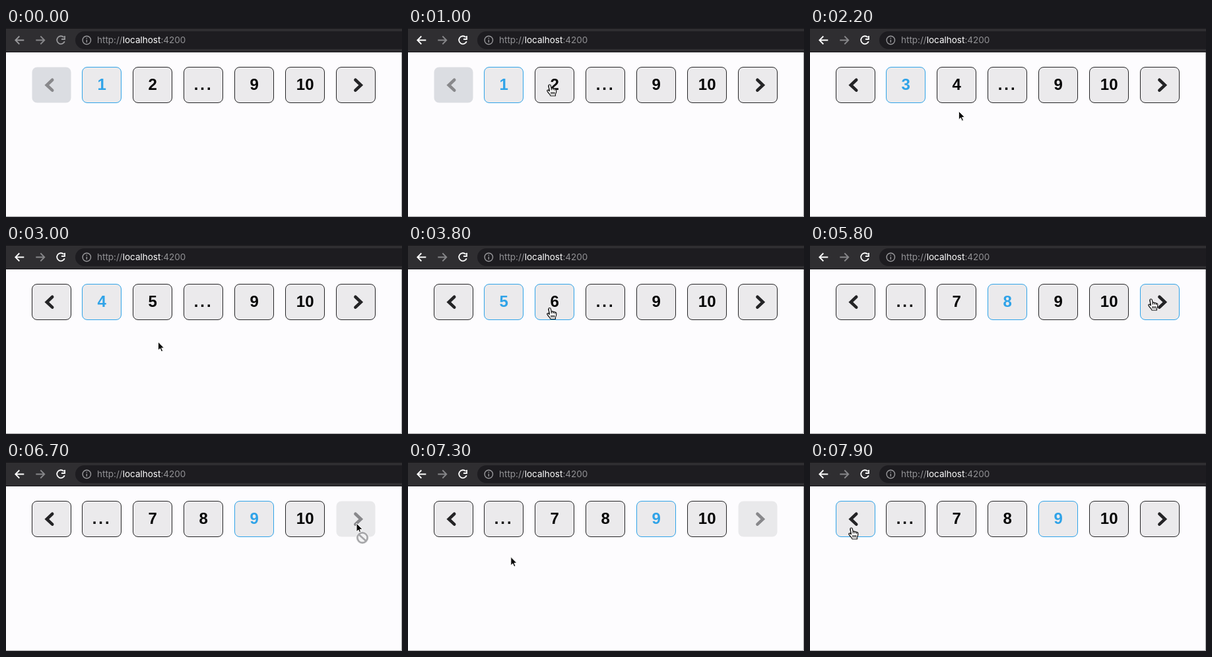
Animation, 600 px wide and 287 px high, one loop 8 s. Source, as an HTML page:

```html
<!DOCTYPE html>
<html lang="en">
<head>
<meta charset="utf-8">
<title>Pagination</title>
<style>
  html, body { margin: 0; width: 100%; height: 100%; overflow: hidden; background: #fdfcfe; }
  svg { display: block; width: 600px; height: 287px; }
  .label { font: bold 24px "Liberation Sans", Arial, sans-serif; text-anchor: middle; }
  .url { font: 13.5px Inter, Roboto, sans-serif; fill: #929295; }
  .line { fill: none; stroke-width: 1.8; }
</style>
</head>
<body>
<svg viewBox="0 0 600 287">
  <rect width="600" height="287" fill="#fdfcfe"/>
  <rect width="600" height="37" fill="#161518"/>
  <rect y="1" width="600" height="35" fill="#2f2e31"/>
  <rect x="105" y="5" width="520" height="27" rx="13.5" fill="#1d1c20"/>
  <g class="line">
    <path class="nav" d="M27.3 18.5H15M20.3 12.5L14.3 18.5L20.3 24.5"/>
    <path d="M45.3 18.5H57.6M52.3 12.5L58.3 18.5L52.3 24.5" stroke="#87878a"/>
    <path class="nav" d="M87.6 14.2A6 6 0 1 0 88.8 20.4M89 12V17H84"/>
    <g stroke="#98989b" stroke-width="1.4">
      <circle cx="122.3" cy="18.5" r="6.2"/>
      <path d="M122.3 17.8V22M122.3 14.8V16.3"/>
    </g>
  </g>
  <text class="url" x="138" y="23.3">http://<tspan fill="#fff">localhost</tspan>:4200</text>
  <g id="buttons"></g>
  <path d="M599.5 37V286.5H0" fill="none" stroke="#a3a2a5"/>
  <g id="cursor">
    <g id="hand" stroke="#111" stroke-width="1.2" stroke-linejoin="round">
      <path fill="#fff" d="M-2 1.5C-2-.3 .8-.6 1.2 1.2L2.3 6C2.6 4.8 4.8 4.9 5 6.4C5.4 5.4 7.4 5.6 7.6 7C8.2 6.3 9.7 6.7 9.8 8.2C10 11 9.4 12.5 8.4 14.2V17H1L-.4 14.5C-2 13-3.4 11-4.2 9.6C-4.6 8.4-3 7.6-1.8 8.8L-.8 9.8Z"/>
      <path fill="none" d="M-2 1.5L-.8 9.8M2.3 6V8.5M5 6.4V8.5M7.6 7V9M2 11V14.5M4.2 11V14.5M6.4 11V14.5"/>
    </g>
    <path id="arrow" fill="#080808" stroke="#fff" stroke-linejoin="round"
      d="M0 0V13L3 10.2L5 15L7.2 14L5.2 9.4H9.2Z"/>
    <g id="denied" fill="none" stroke="#a6a6a9" stroke-width="2.6">
      <circle cx="9" cy="22" r="10" fill="#f3f3f4" stroke="none"/>
      <path d="M3.5 17L14.5 27"/>
      <circle cx="9" cy="22" r="7.6"/>
    </g>
  </g>
</svg>
<script>
const LOOP = 8000, STEP = 100;
const BLUE = '#2fa3e8', INK = '#242426';
const PREV = 0, NEXT = 6, SIZE = 59, TOP = 59.5;
const FOCUS_AT = 700, BACK_AT = 7700;
const FORWARD_CLICKS = [1200, 1600, 2700, 3400, 3900, 5200, 5700, 6000, 6300];
const $ = id => document.getElementById(id);

function add(parent, tag, attrs) {
  const el = document.createElementNS('http://www.w3.org/2000/svg', tag);
  for (const key in attrs) el.setAttribute(key, attrs[key]);
  return parent.appendChild(el);
}

const buttonX = i => Math.floor(39 + 76.85 * i) + 0.5;

function chevron(i) {
  const side = i === PREV ? -1 : 1;
  const tip = buttonX(i) + SIZE / 2 + (side < 0 ? -7.2 : 7.8);
  return `M${tip - 8.4 * side} 78.8l${8.4 * side} 7.9l${-8.4 * side} 7.9`;
}

const buttons = Array.from({ length: 7 }, (_, i) => {
  const box = add($('buttons'), 'rect', { x: buttonX(i), y: TOP, width: SIZE, height: 54, rx: 7.5 });
  const mark = i === PREV || i === NEXT
    ? add($('buttons'), 'path', { d: chevron(i), fill: 'none', 'stroke-width': 4.6, 'stroke-linecap': 'round' })
    : add($('buttons'), 'text', { class: 'label', x: buttonX(i) + SIZE / 2 + 0.2, y: 94 });
  return { box, mark };
});

function ease(t, from, to) {
  const k = Math.min(1, Math.max(0, (t - from) / (to - from)));
  return k * k * (3 - 2 * k);
}

const mix = (a, b, k) => ({ x: a.x + (b.x - a.x) * k, y: a.y + (b.y - a.y) * k });

// The pointer dips below the second button between clicks, then visits next and previous.
function pointerAt(t) {
  if (t < 400) return null;
  const dip = t > 1500 ? Math.max(0, Math.cos(2 * Math.PI * (t - 2020) / 1100)) : 0;
  const second = { x: 215 + 20 * dip, y: 86 + 0.0034 * Math.max(0, t - 1000) + 70 * dip };
  const back = ease(t, 6800, 7500);
  let p = mix({ x: 176, y: 119 }, second, ease(t, 400, 500));
  p = mix(p, { x: 517, y: 82 }, ease(t, 4200, 4450));
  p = mix(p, { x: 531, y: 93 }, ease(t, 6600, 6700));
  p = mix(p, { x: 63, y: 100 }, back);
  p.y += 78 * Math.sin(Math.PI * back);
  return p;
}

function hitTest(p) {
  if (!p || p.y < TOP || p.y > TOP + 54) return -1;
  return buttons.findIndex((_, i) => p.x >= buttonX(i) && p.x <= buttonX(i) + SIZE);
}

const pageAt = t => t >= BACK_AT ? 9 : 1 + FORWARD_CLICKS.filter(c => c <= t).length;
const labelsFor = page => page < 7 ? [page, page + 1, '...', 9, 10] : ['...', 7, 8, 9, 10];
const show = (id, on) => { $(id).style.display = on ? '' : 'none'; };

function render(t) {
  const page = pageAt(t);
  const pointer = pointerAt(t);
  const over = hitTest(pointer);
  const labels = labelsFor(page);
  const isDisabled = i => (i === PREV && page === 1) || (i === NEXT && page === 10);

  buttons.forEach(({ box, mark }, i) => {
    const disabled = isDisabled(i);
    const label = labels[i - 1];
    const active = label === Math.min(page, 9);
    const hovered = i === over && t > 1000;
    box.setAttribute('fill', !disabled ? '#ebeaec' : i === PREV ? '#dbdde2' : '#e9e9eb');
    box.setAttribute('stroke', disabled ? 'none' : active || hovered ? BLUE : INK);
    if (label === undefined) {
      mark.setAttribute('stroke', disabled ? '#88888b' : INK);
    } else {
      mark.textContent = label;
      mark.setAttribute('fill', active ? BLUE : '#050505');
      mark.setAttribute('letter-spacing', label === '...' ? 3 : 0);
    }
  });

  const navColor = t < FOCUS_AT ? '#98989b' : '#fff';
  document.querySelectorAll('.nav').forEach(el => el.setAttribute('stroke', navColor));

  show('cursor', pointer);
  if (!pointer) return;
  // The hand stays until the pointer moves again.
  const denied = isDisabled(over) && t > 6600;
  const hand = over >= 0 && !denied;
  $('cursor').setAttribute('transform', `translate(${pointer.x} ${pointer.y})`);
  show('hand', hand);
  show('arrow', !hand);
  show('denied', denied);
}

const start = performance.now();
function tick() {
  const t = (performance.now() - start) % LOOP;
  render(Math.floor(t / STEP) * STEP);
  requestAnimationFrame(tick);
}
tick();
</script>
</body>
</html>
```
